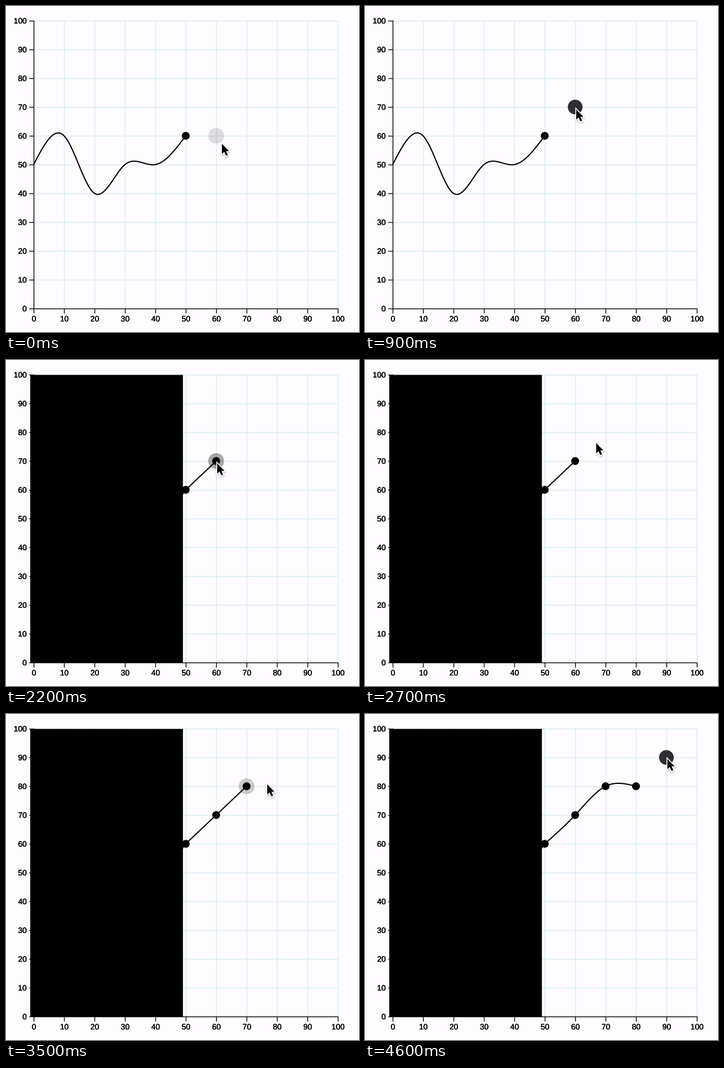
A matplotlib script that plays this animation: 600 px wide and 555 px high, repeating every 4.7 s.

```python
import numpy as np
import matplotlib.pyplot as plt
from matplotlib.animation import FuncAnimation
from matplotlib.patches import Circle, Polygon, Rectangle
from matplotlib.patheffects import withStroke

W, H, DPI = 600, 555, 100
FRAMES, INTERVAL = 47, 100
PX = 72 / DPI
UNIT = 4 / 3
BG, GRID = "#fefcfe", "#d9ecf5"
BLOCK_FRAME = 17
RING, RING_CLICKED = 12.5, 13.4

plt.rcParams["font.family"] = "Liberation Sans"
fig = plt.figure(figsize=(W / DPI, H / DPI), dpi=DPI, facecolor=BG)
ax = fig.add_axes([0, 0, 1, 1])
ax.set_xlim(0, W)
ax.set_ylim(H, 0)
ax.axis("off")


def sx(v):
    return 47 + 5.17 * np.asarray(v)


def sy(v):
    return 515 - 4.9 * np.asarray(v)


def stroke(xs, ys, color="black", width=UNIT, z=2):
    return ax.plot(xs, ys, color=color, lw=width * PX, zorder=z, snap=False,
                   solid_capstyle="butt")[0]


def draw_chart():
    # Axes and grid sit half a pixel off the data scale.
    left, right = sx(0) + .5, sx(100) + .5
    top, bottom = sy(100) + .5, sy(0) + .5
    half, tick = UNIT / 2, 6 * UNIT
    font = dict(fontsize=10 * UNIT * PX, va="baseline", zorder=2,
                path_effects=[withStroke(linewidth=.35 * PX, foreground="black")])
    for v in range(0, 101, 10):
        x, y = sx(v) + .5, sy(v) + .5
        stroke([x, x], [top - half, bottom], GRID, z=1)
        stroke([left, right + half], [y, y], GRID, z=1)
        stroke([x, x], [bottom, bottom + tick])
        stroke([left - tick, left], [y, y])
        ax.text(x, bottom + 21.5, str(v), ha="center", **font)
        ax.text(left - 12.2, y + 4.3, str(v), ha="right", **font)
    stroke([left, left], [top - half, bottom + half])
    stroke([left - half, right + half], [bottom, bottom])


def natural_spline(ys, steps=24):
    """Natural cubic spline through equally spaced values."""
    n = len(ys)
    a = np.eye(n)
    rhs = np.zeros(n)
    for i in range(1, n - 1):
        a[i, i - 1:i + 2] = 1, 4, 1
        rhs[i] = 6 * (ys[i - 1] - 2 * ys[i] + ys[i + 1])
    m = np.linalg.solve(a, rhs)
    t = np.linspace(0, n - 1, (n - 1) * steps + 1)
    k = np.minimum(t.astype(int), n - 2)
    u = t - k
    v = 1 - u
    y = (m[k] * (v**3 - v) + m[k + 1] * (u**3 - u)) / 6
    return 10 * t, y + v * ys[k] + u * ys[k + 1]


class Stop:
    """A spot where the pointer rests: hover, click, move on."""

    def __init__(self, arrive, click, leave, x, y, tip):
        self.arrive, self.click, self.leave = arrive, click, leave
        self.x, self.y, self.tip = x, y, np.array(tip)
        self.centre = np.array([sx(x), sy(y)])
        inside = np.hypot(*(self.tip - self.centre)) < RING_CLICKED
        self.fade = max(leave, click + 2) if inside else click + 2

    def opacity(self, t):
        shown = .83 * np.clip((t - self.arrive + 3) / 3, 0, 1)
        if t >= self.click:
            shown = np.interp(t, [self.click, self.click + 2], [.5, .2])
        return shown * np.clip(1 - .75 * (t - self.fade), 0, 1)


HISTORY = np.array([50, 60, 40, 50, 50, 60])
STOPS = [
    Stop(-9, -2.5, 2, 60, 60, (367, 234.5)),
    Stop(9, 21, 24, 60, 70, (359, 176)),
    Stop(30, 33, 32, 70, 80, (408, 126)),
    Stop(38, 39, 41, 80, 80, (460, 117)),
    Stop(46, FRAMES, FRAMES, 90, 90, (514, 76.5)),
]
ADDED = STOPS[1:]
ARROW = .97 * np.array([(0, 0), (0, 18), (4.1, 14.2), (7.2, 21), (10.3, 19.6),
                        (7.3, 13), (12.6, 13)])


def pointer_tip(t):
    tip = STOPS[0].tip
    for a, b in zip(STOPS, STOPS[1:]):
        u = np.clip((t - a.leave) / (b.arrive - a.leave), 0, 1)
        tip = tip + (b.tip - a.tip) * (1 - (1 - u) ** 1.7)
    return tip


def disc(centre, radius, color, z):
    return ax.add_patch(Circle(centre, radius, fc=color, lw=0, zorder=z))


def pointer_part(color, width, z, **kw):
    return ax.add_patch(Polygon(ARROW, fc=color, ec=color, lw=width * PX,
                                zorder=z, **kw))


draw_chart()
past_x, past_y = natural_spline(HISTORY)
stroke(sx(past_x), sy(past_y), width=1.5 * UNIT, z=3)
disc((sx(50), sy(60)), 5 * UNIT, "black", 6)
tail = stroke([], [], width=1.5 * UNIT, z=3)
block = ax.add_patch(Rectangle((41.2, 25.4), 259.5, 490, color="black",
                               lw=0, zorder=4, snap=False))
rings = [disc(s.centre, RING, "#040408", 5) for s in STOPS]
dots = [disc(s.centre, 5 * UNIT, "black", 6) for s in ADDED]
shadows = [pointer_part("black", w, 7, alpha=.045, joinstyle="round")
           for w in (2.5, 4, 5.5, 7)]
pointer = [pointer_part("white", 3, 8, joinstyle="miter"),
           pointer_part("black", 0, 9)]


def update(t):
    placed = [s.y for s in ADDED if t >= s.click]
    xs, ys = natural_spline(np.array([HISTORY[-1], *placed]))
    tail.set_data(sx(50 + xs), sy(ys))
    for i, dot in enumerate(dots):
        dot.set_visible(i < len(placed))
    block.set_visible(t >= BLOCK_FRAME)

    for ring, stop in zip(rings, STOPS):
        ring.set_alpha(stop.opacity(t))
        ring.set_radius(RING_CLICKED if t >= stop.click else RING)

    tip = pointer_tip(t)
    for part in shadows:
        part.set_xy(ARROW + tip + (0.3, 1.6))
    for part in pointer:
        part.set_xy(ARROW + tip)
    return [tail, block, *rings, *dots, *shadows, *pointer]


anim = FuncAnimation(fig, update, frames=FRAMES, interval=INTERVAL,
                     repeat=True, repeat_delay=0, blit=False)
plt.show()
```
